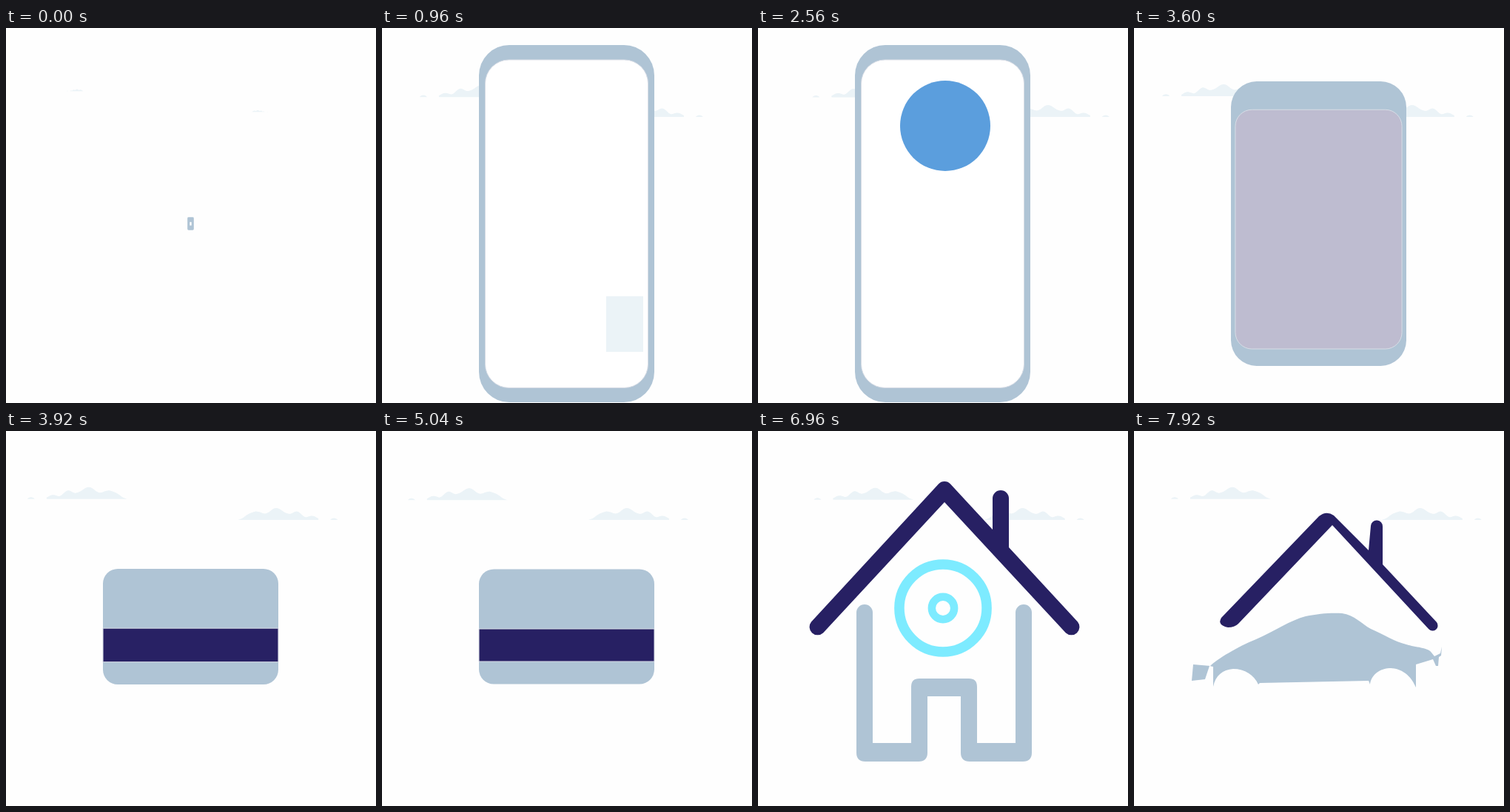
An HTML page for the animation above (8000 ms loop, 500x506 px).

```html
<!DOCTYPE html>
<html lang="en">
<head>
<meta charset="utf-8">
<title>Shape morphs</title>
<style>
  html, body { margin: 0; width: 100%; height: 100%; overflow: hidden; background: #fefefe; }
  svg { display: block; width: 100vw; height: 100vh; }
</style>
</head>
<body>
<svg viewBox="0 0 500 506" preserveAspectRatio="none">
  <defs>
    <path id="hills" d="M0 0V-2C4-4 6-6 10-5.5C14-5 15-3 18-4C23-6 25-12 30-11.5C34-11 36-7 41-8.5C48-10 51-16 57-16C63-16 66-9 72-8.5C77-9 80-12 85-11.5C92-10 97-7 101-3.5C104-1 107-1 109 0ZM-26 0C-24-3.5-18-3.5-16 0Z" transform="translate(-41.5 8)"/>
  </defs>
  <g fill="#ebf3f7">
    <use id="cloudLeft" href="#hills"/>
    <use id="cloudRight" href="#hills"/>
  </g>
  <path id="body" fill="#afc4d5"/>
  <path id="panel" stroke="#d8dde6" stroke-width="1"/>
  <rect id="block" y="362" height="75" fill="#ebf3f7"/>
  <circle id="badge" cx="253" cy="132" fill="#5b9edd"/>
  <g id="rings" fill="none" stroke="#7debff">
    <circle r="56.5" stroke-width="13"/>
    <circle r="14.5" stroke-width="10"/>
  </g>
</svg>
<script>
const LOOP = 8000;
const $ = id => document.getElementById(id);
const set = (id, attrs) => {
  for (const key in attrs) $(id).setAttribute(key, attrs[key]);
};

// Easing
const mix = (a, b, p) => a + (b - a) * p;
const span = (t, start, length) => Math.min(1, Math.max(0, (t - start) / length));
const inOut = p => p < 0.5 ? 4 * p ** 3 : 1 - (2 - 2 * p) ** 3 / 2;
const outQuart = p => 1 - (1 - p) ** 4;
const inBack = p => 2.70158 * p ** 3 - 1.70158 * p ** 2;
const wave = p => (1 - Math.cos(Math.PI * p)) / 2;

function swing(t, keys) {
  let i = 0;
  while (i < keys.length - 2 && t >= keys[i + 1][0]) i++;
  const [t0, a] = keys[i], [t1, b] = keys[i + 1];
  return mix(a, b, wave((t - t0) / (t1 - t0)));
}

// Paths
function roundRect(cx, cy, w, h, r) {
  const x = cx - w / 2, y = cy - h / 2, a = `a${r} ${r} 0 0 1 `;
  const dx = w - 2 * r, dy = h - 2 * r;
  return `M${x} ${y + r}${a}${r} ${-r}h${dx}${a}${r} ${r}v${dy}${a}${-r} ${r}h${-dx}${a}${-r} ${-r}Z`;
}

function sample(d, count = 240) {
  const path = document.createElementNS('http://www.w3.org/2000/svg', 'path');
  path.setAttribute('d', d);
  const length = path.getTotalLength();
  return Array.from({ length: count }, (_, i) => path.getPointAtLength(length * i / count));
}

function morpher(from, to) {
  const a = sample(from), b = sample(to);
  return p => {
    if (p <= 0) return from;
    if (p >= 1) return to;
    return 'M' + a.map((q, i) =>
      mix(q.x, b[i].x, p).toFixed(2) + ' ' + mix(q.y, b[i].y, p).toFixed(2)).join('L') + 'Z';
  };
}

const card = roundRect(249.5, 264, 237, 155, 20);
const stripe = 'M131 311V267H368V311Z';
const walls = 'M133 245A11 11 0 0 1 155 245V421H207V345Q207 334 218 334H285Q296 334 296 345V421H348V245' +
  'A11 11 0 0 1 370 245V434Q370 446 358 446H286Q274 446 274 434V358H229V434Q229 446 217 446H145Q133 446 133 434Z';
const roof = 'M72 257.5L244 71.5A11 11 0 0 1 260 71.5L317 133V91A11 11 0 0 1 339 91V157L432 257.5' +
  'A11 11 0 0 1 416 272.5L252 96L88 272.5A11 11 0 0 1 72 257.5Z';
const car = 'M103 317C112 308 140 291 165 281C190 270 212 255 232 250C250 246 268 245 281 246' +
  'C298 248 307 260 320 267C338 275 352 284 368 288C380 292 398 292 402 299L406 304L414 300L416 291L415 303' +
  'L412 305L411 317L408 317L404 308L381 315V346C372 325 357 320 345 320C330 321 320 331 319 342L317 337' +
  'L170 340L168 342C162 329 150 321 134 321C120 322 110 330 107 345V318L102 317L96 335L78 337L80 315Z';
const carRoof = 'M118 252L250 115Q260 107 270 114L317 161L320 128A8 8 0 0 1 336 129V180L409 258' +
  'A7 7 0 0 1 398 267L268 127L141 260Q136 265 127 265Q112 262 118 252Z';

const cardToWalls = morpher(card, walls);
const stripeToRoof = morpher(stripe, roof);
const wallsToCar = morpher(walls, car);
const roofToCarRoof = morpher(roof, carRoof);

const leftKeys = [[-300, 24], [2200, 77], [4340, 24], [6690, 77], [9120, 24]];
const rightKeys = [[-260, 274], [2640, 340], [5550, 274], [8450, 340]];

function drawClouds(t) {
  const s = inOut(span(t, -276, 800));
  const y = 85 - 1.2 * Math.cos(2 * Math.PI * (t - 3850) / 4000);
  set('cloudLeft', { transform: `translate(${swing(t, leftKeys) + 67.5} ${y}) scale(${s})` });
  set('cloudRight', { transform: `translate(${swing(t, rightKeys) + 67.5} 112) scale(${-s} ${s})` });
}

function drawDevice(t) {
  const size = inOut(span(t, -166, 800));
  const screen = inOut(span(t, -110, 800));
  const p = outQuart(span(t, 3560, 480));
  const shade = [39, 32, 99].map(c => Math.round(mix(255, c, p)));
  set('body', {
    d: roundRect(249.5, 264, 237 * size, mix(482, 155, p) * size, mix(41, 20, p) * size)
  });
  set('panel', {
    d: roundRect(249.5, mix(264.2, 289, p), mix(220, 237, p) * screen,
      mix(442.5, 44, p) * screen, mix(32, 0, p) * screen),
    fill: `rgb(${shade})`,
    'stroke-opacity': screen
  });
}

function drawBuilding(t) {
  const house = outQuart(span(t, 5290, 480));
  const drive = outQuart(span(t, 7070, 500));
  set('body', { d: drive ? wallsToCar(drive) : cardToWalls(house) });
  set('panel', {
    d: drive ? roofToCarRoof(drive) : stripeToRoof(house),
    fill: '#272063',
    'stroke-opacity': 0
  });
}

function drawContent(t) {
  const enter = inOut(span(t, 725, 600)), leave = inOut(span(t, 1800, 400));
  set('block', { x: 353 - 206 * enter, width: 206 * Math.max(0, enter - leave) });
  const badge = inOut(span(t, 1840, 480)) - inOut(span(t, 3040, 460));
  set('badge', { r: 61 * Math.max(0, badge) });
  const ring = outQuart(span(t, 5400, 500)) - inBack(span(t, 6700, 450));
  set('rings', { transform: `translate(250 239) scale(${Math.max(0, ring)})` });
}

function render(t) {
  drawClouds(t);
  (t < 5290 ? drawDevice : drawBuilding)(t);
  drawContent(t);
}

const start = performance.now();
function tick() {
  render((performance.now() - start) % LOOP);
  requestAnimationFrame(tick);
}
tick();
</script>
</body>
</html>
```
